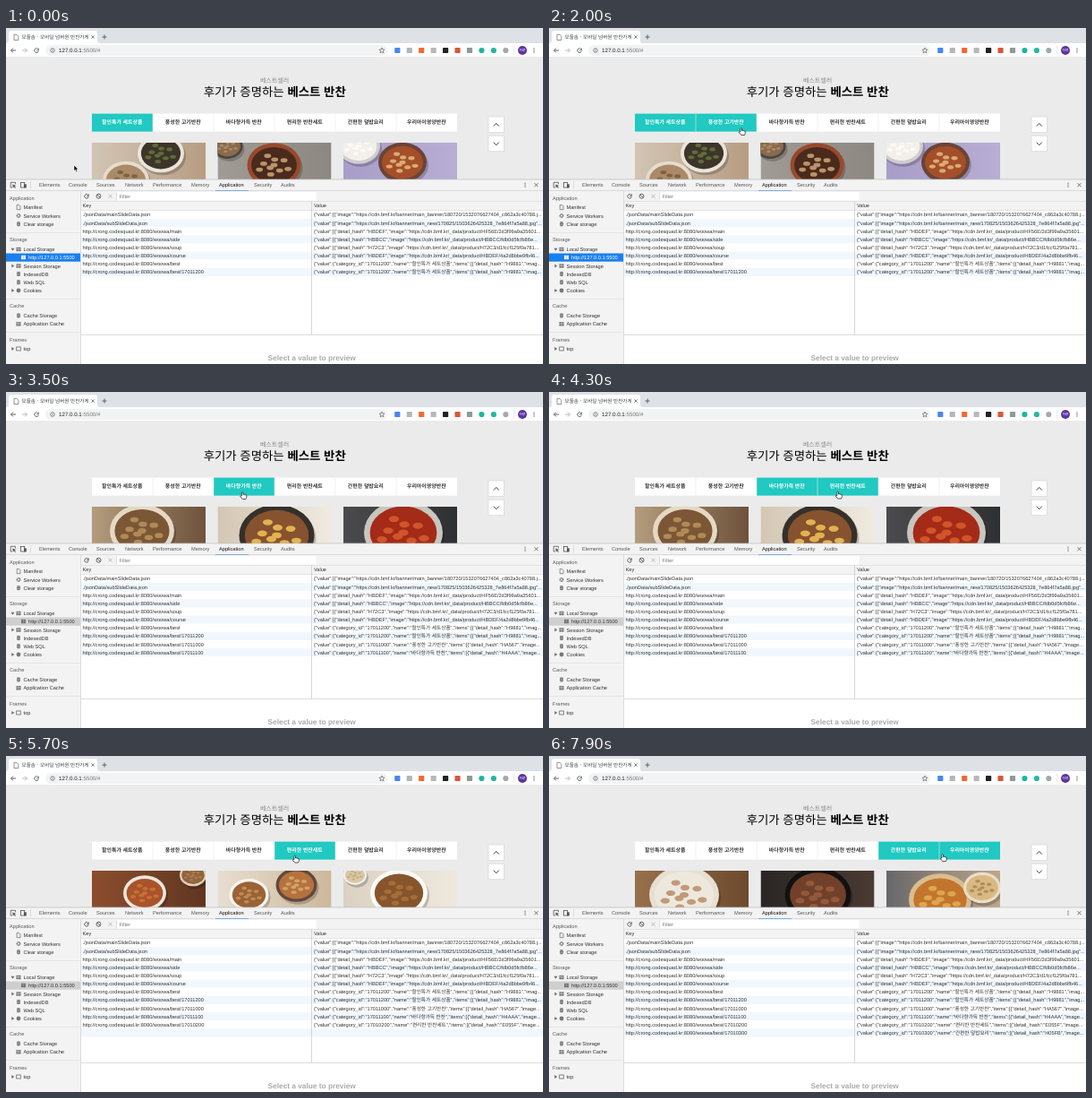
These frames come from a looping animation (600 by 375 pixels, 8 s). An HTML page:

```html
<!DOCTYPE html>
<html lang="ko">
<head>
<meta charset="utf-8">
<style>
html, body { margin: 0; width: 100%; height: 100%; overflow: hidden; background: #fff; }
svg { display: block; width: 600px; height: 375px; }
text { font: 5.65px 'Liberation Sans', 'Noto Sans CJK KR', 'Noto Sans CJK', sans-serif; fill: #333; text-rendering: geometricPrecision; }
.ko { font-family: 'Noto Sans CJK KR', 'Noto Sans CJK', sans-serif; }
</style>
</head>
<body>
<svg id="stage" viewBox="0 0 600 375"></svg>
<script>
const LOOP = 8000, TEAL = '#20c9c1', LINE = '#cdcdcd';
const stage = document.getElementById('stage');

const rect = (x, y, w, h, fill, more = '') =>
  `<rect x="${x}" y="${y}" width="${w}" height="${h}" fill="${fill}" ${more}/>`;
const oval = (x, y, rx, ry, fill, more = '') =>
  `<ellipse cx="${x}" cy="${y}" rx="${rx}" ry="${ry}" fill="${fill}" ${more}/>`;
const path = (d, stroke = '#5f6368', width = 1, fill = 'none') =>
  `<path d="${d}" stroke="${stroke}" stroke-width="${width}" fill="${fill}"/>`;
const text = (x, y, s, style = '', more = '') =>
  `<text x="${x}" y="${y + 2}" style="${style}" ${more}>${s}</text>`;
const centred = (x, y, s, style, more = '') =>
  text(x, y, s, style + ';text-anchor:middle', more);
const cross = (x, y, r, color, width = .8) =>
  path(`M${x - r} ${y - r}l${2 * r} ${2 * r}m0 ${-2 * r}l${-2 * r} ${2 * r}`, color, width);
const reload = (x, y, r, color) =>
  path(`M${x + r * .7} ${y - r * .7}A${r} ${r} 0 1 0 ${x + r} ${y + r * .3}M${x + r} ${y - r}v${r * .9}h${-r * .9}`, color, .9);
const dots = (x, y) => [-2, 0, 2].map(d => oval(x, y + d, .65, .65, '#5f6368')).join('');

const categories = [
  ['17011200', '할인특가 세트상품', 'H9881', 'imag'],
  ['17011000', '풍성한 고기반찬', 'HA567', 'image'],
  ['17011100', '바다향가득 반찬', 'H4AAA', 'image'],
  ['17010200', '편리한 반찬세트', 'E055F', 'image'],
  ['17010300', '간편한 덮밥요리', 'H05FB', 'image'],
  ['', '우리아이영양반찬']
];
const clicks = [2300, 3300, 5500, 7300];

// Each photo: two background tones, then dishes as x, y, radius, rim, food, garnish.
const photoSets = [
  [
    ['#d2c5b4', '#b69d82', [38, 42, 26, '#e6dccd', '#a98a69', '#84623f'], [77, 12, 26, '#eae4da', '#3d3529', '#5f6b3a']],
    ['#a09b94', '#8d8781', [11, 4, 17, '#4b443f', '#8a6a4c', '#a98a64'], [63, 25, 30, '#98492c', '#4a2a1d', '#b9946a']],
    ['#a79dc8', '#b8aed4', [17, 4, 24, '#d0cbd0', '#f3f0e9', '#fbfaf7'], [66, 22, 27, '#6b4436', '#a54f2a', '#d9ab72']]
  ], [
    ['#34312e', '#cbbfac', [55, 32, 41, '#1d1c1b', '#98633a', '#d29b52']],
    ['#d3c6b3', '#f0eae0', [66, 32, 42, '#36302b', '#87522f', '#e3b250']],
    ['#e0ddd7', '#f1efeb', [56, 27, 38, '#9b7a59', '#f1efec', '#f6f5f2']]
  ], [
    ['#b49c7d', '#6e523c', [56, 27, 36, '#e5d9c5', '#7b5735', '#b08a56']],
    ['#d3c6b3', '#f0eae0', [66, 32, 42, '#36302b', '#87522f', '#e3b250']],
    ['#4b4b4d', '#2f3032', [67, 29, 44, '#c9c5bf', '#a32b17', '#d2542a']]
  ], [
    ['#8c4d2e', '#603620', [59, 25, 24, '#eee7dd', '#a9532b', '#c56f36'], [113, 5, 15, '#ded1bc', '#92643b', '#ab7c50']],
    ['#e7ded0', '#cdb79b', [35, 27, 22, '#f8f5ee', '#9b6237', '#c08d52'], [88, 16, 23, '#62483b', '#b5723f', '#d0a267']],
    ['#dbd1c2', '#eee8de', [62, 25, 32, '#fbfaf6', '#87552c', '#a56d38'], [13, 5, 13, '#f5f2ec', '#d9c7a6', '#c4aa80']]
  ], [
    ['#98704b', '#6d4a2f', [55, 27, 39, '#e7dfd1', '#eee8dc', '#c09a7a']],
    ['#2a2625', '#4a3a32', [64, 27, 37, '#12110f', '#70402b', '#94593a']],
    ['#67676a', '#bfa689', [60, 32, 35, '#d9bd8f', '#c3752d', '#dda650'], [107, 19, 21, '#e8decb', '#d9b980', '#b08d60']]
  ]
];

function photo([from, to, ...dishes], i, id) {
  const x0 = 96 + i * 140.5, y0 = 128;
  let out = `<linearGradient id="${id}"><stop stop-color="${from}"/><stop offset="1" stop-color="${to}"/></linearGradient>`
    + `<clipPath id="c${id}">${rect(x0, y0, 127, 41, '#000')}</clipPath><g clip-path="url(#c${id})">`
    + rect(x0, y0, 127, 41, `url(#${id})`);
  for (const [dx, dy, r, rim, food, garnish] of dishes) {
    const x = x0 + dx, y = y0 + dy;
    out += oval(x + 2, y + 3, r, r * .82, '#000', 'opacity=".2"')
      + oval(x, y, r, r * .82, rim) + oval(x, y, r * .85, r * .67, food);
    for (let j = 0; j < 10; j++) {
      const a = j * 2.4, q = r * .62 * Math.sqrt(j / 10);
      out += oval(x + q * Math.cos(a), y + q * .75 * Math.sin(a), r * .13, r * .08, garnish);
    }
  }
  return out + '</g>';
}

function browserBar() {
  const extensions = ['#4688f1', '#b3b6ba', '#f06a35', '#b5b8bc', '#222', '#d9583b', '#8f9a98', '#1cb5a3', '#27b79d', '#a5a8ad'];
  return rect(0, 0, 600, 17, '#dee1e6')
    + path('M0 17Q3 17 3 14V6Q3 3 6 3H99Q102 3 102 6V14Q102 17 105 17Z', 'none', 0, '#fff')
    + path('M9 7.3h3l1.8 1.8v4.4h-4.8Z', '#666', .7)
    + text(17.5, 10, '모둘솜 - 모바일 넘버원 반찬가게', 'font-size:5.6px;fill:#3c4043', 'class="ko"')
    + cross(97, 10, 1.6, '#5f6368') + path('M107.5 10h5m-2.5-2.5v5')
    + rect(0, 17, 600, 16, '#fff')
    + path('M11 25H5.5m2.5-2.5L5.5 25 8 27.5') + path('M18 25h5.5M21 22.5l2.5 2.5-2.5 2.5', '#babcbe')
    + reload(34, 25, 2.4, '#5f6368')
    + rect(44, 19, 382, 12, '#f1f3f4', 'rx="6"')
    + oval(52, 25, 2.3, 2.3, 'none', 'stroke="#5f6368" stroke-width=".7"') + path('M52 24.6v1.7M52 23.4v.6', '#5f6368', .7)
    + text(59, 25, '127.0.0.1<tspan fill="#777">:5500/#</tspan>', 'font-size:6.2px;fill:#202124')
    + path('M420 22l.9 2 2.1.2-1.6 1.4.5 2.2-1.9-1.2-1.9 1.2.5-2.2-1.6-1.4 2.1-.2Z', '#5f6368', .7)
    + extensions.map((c, i) => rect(434.2 + i * 13.45, 21.9, 6.2, 6.2, c, `rx="${i < 7 ? .8 : 3.1}"`)).join('')
    + rect(567.5, 20, .6, 10, '#d5d7da') + oval(577, 25, 5, 5, '#5b35a0')
    + centred(577, 24.4, '하루', 'font-size:3.8px;fill:#fff') + dots(590, 25)
    + rect(0, 32.5, 600, .6, '#d8d8d8');
}

function page() {
  let out = rect(0, 33, 600, 137, '#ebebeb')
    + centred(300, 58.8, '베스트셀러', 'font-size:7px;fill:#888', 'class="ko"')
    + centred(300.2, 74.2, '후기가 증명하는 <tspan font-weight="700">베스트 반찬</tspan>', 'font-size:13.4px;font-weight:350;fill:#000', 'class="ko"');
  categories.forEach(([, name], i) => {
    out += rect(96 + i * 68, 95.6, 68, 20, '#fff', 'class="tab"')
      + centred(129.8 + i * 68, 105.1, name, 'font-size:5.95px;font-weight:700', 'class="ko label"');
    if (i) out += rect(95.7 + i * 68, 95.6, .6, 20, '#e6e6e6');
  });
  out += photoSets.map((set, s) => `<g class="photos">${set.map((p, i) => photo(p, i, `p${s}${i}`)).join('')}</g>`).join('');
  for (const [y, d] of [[99, 'M544.8 109.6l3-3.2 3 3.2'], [120.2, 'M544.8 127.6l3 3.2 3-3.2']])
    out += rect(539, y, 17.5, 17.5, '#fff', 'stroke="#d6d6d6" stroke-width=".7"') + path(d, '#444', 1);
  return out;
}

function sidebar() {
  const heads = [['Application', 190], ['Storage', 236], ['Cache', 310], ['Frames', 347.5]];
  const items = [['Manifest', 200], ['Service Workers', 209.5], ['Clear storage', 218.7], ['Local Storage', 247], ['Session Storage', 265.5],
    ['IndexedDB', 274.6], ['Web SQL', 283.8], ['Cookies', 293], ['Cache Storage', 321], ['Application Cache', 330.3], ['top', 358]];
  const tree = { 'Local Storage': 'M5.5 245.7h4l-2 3Z', 'Session Storage': 'M6.3 263.5v4l3-2Z', Cookies: 'M6.3 291v4l3-2Z', top: 'M6.3 356v4l3-2Z' };
  const grid = (x, y, color, line = '#f3f3f3') =>
    rect(x - 2.5, y - 2.2, 5, 4.4, color) + path(`M${x - 2.5} ${y - .3}h5M${x} ${y - 2.2}v4.4`, line, .5);
  const icon = (name, y) =>
    name == 'Manifest' ? path(`M12.2 ${y - 2.6}h2.4l1.4 1.5v3.8h-3.8Z`, '#666', .7)
    : name == 'Service Workers' ? oval(14, y, 1.7, 1.7, 'none', 'stroke="#666" stroke-width="1.4" stroke-dasharray="1 .4"')
    : name == 'top' ? rect(11.7, y - 2, 4.6, 4, 'none', 'stroke="#666" stroke-width=".8"')
    : name == 'Cookies' ? oval(14, y, 2.4, 2.4, '#777')
    : name == 'Clear storage' || name == 'IndexedDB' || name == 'Web SQL' || name == 'Cache Storage'
      ? rect(12, y - 2.5, 4, 5, '#6e6e6e', 'rx="1.4"') + path(`M12 ${y - .9}h4m-4 1.8h4`, '#f3f3f3', .4)
    : grid(14, y, '#6e6e6e');
  return rect(0, 182, 83, 193, '#f3f3f3')
    + [228, 302, 339.5].map(y => rect(0, y, 83, .6, '#dcdcdc')).join('')
    + heads.map(([s, y]) => text(4, y, s, 'fill:#5a5a5a')).join('')
    + rect(0, 251.5, 83, 9.2, '#1a80f0', 'id="pick"')
    + `<g id="pickIcon">${grid(19.5, 256, 'currentColor', '#aaa')}</g>`
    + text(25, 256, 'http://127.0.0.1:5500', '', 'id="pickText"')
    + items.map(([s, y]) => icon(s, y) + text(19.5, y, s) + (tree[s] ? path(tree[s], 'none', 0, '#6e6e6e') : '')).join('')
    + rect(83, 182, .7, 193, LINE);
}

function table() {
  const host = 'http://crong.codesquad.kr:8080/woowa/', cdn = 'https://cdn.bmf.kr/';
  const banner = s => `{"value":[{"image":"${cdn}banner/${s}...`;
  const product = (hash, s) => `{"value":[{"detail_hash":"${hash}","image":"${cdn}_data/product/${s}...`;
  const category = ([id, name, hash, tail]) => `{"value":{"category_id":"${id}","name":"${name}","items":[{"detail_hash":"${hash}","${tail}...`;
  const rows = [
    ['./jsonData/mainSlideData.json', banner('main_banner/180720/1532076627404_c862a3c40788.j')],
    ['./jsonData/subSlideData.json', banner('main_new/170825/1503626425328_7e864f7a5a88.jpg"')],
    [host + 'main', product('HBDEF', 'HF56E/2d3f99a9a35601')],
    [host + 'side', product('HBBCC', 'HBBCC/fdb0d5fcfb86e')],
    [host + 'soup', product('H72C3', 'H72C3/d1fccf125f0a781')],
    [host + 'course', product('HBDEF', 'HBDEF/4a2d8bbe9fb46')],
    [host + 'best', category(categories[0])],
    ...categories.slice(0, 5).map(c => [host + 'best/' + c[0], category(c)])
  ];
  return rect(84, 182, 516, 11.5, '#f3f3f3') + rect(123.5, 183, 223, 9.5, '#fff')
    + reload(90, 187.7, 2.3, '#555')
    + oval(103.5, 187.7, 2.5, 2.5, 'none', 'stroke="#555" stroke-width=".9"') + path('M101.8 186l3.4 3.4', '#555', .9)
    + cross(116.5, 187.7, 2, '#aaa') + rect(123, 183, .6, 9.5, LINE) + text(126.5, 187.7, 'Filter', 'fill:#777')
    + rect(84, 193.2, 516, .6, LINE) + rect(84, 193.8, 516, 9.7, '#f3f3f3')
    + text(85.5, 198.3, 'Key') + text(344, 198.3, 'Value') + rect(84, 203.3, 516, .6, LINE)
    + `<clipPath id="values">${rect(342, 203, 256.5, 140, '#000')}</clipPath>`
    + rows.map(([key, value], i) => {
      const y = 208.4 + i * 9.15;
      return rect(84, y - 4.6, 516, 9.15, i % 2 ? '#f1f7fd' : '#fff', 'class="stripe"')
        + `<g class="row">${text(85.5, y, key)}<g clip-path="url(#values)">${text(344, y, value)}</g></g>`;
    }).join('')
    + rect(341, 193.5, .7, 149, '#c4c4c4') + rect(84, 342, 516, .7, LINE)
    + centred(341.7, 368.8, 'Select a value to preview', 'font-size:8.3px;font-weight:700;fill:#aaa');
}

function devtools() {
  const tabs = { Elements: 37, Console: 70, Sources: 101, Network: 133, Performance: 164, Memory: 207, Application: 238, Security: 277, Audits: 307 };
  return rect(0, 169, 600, 206, '#fff') + rect(0, 169, 600, 12.5, '#f3f3f3') + rect(0, 168.6, 600, .7, '#bbb')
    + rect(0, 181.2, 600, .7, LINE)
    + path('M7 178H5.2V172.3H10.5V174.3', '#555', .8) + path('M7.3 174.5l4 1.5-1.7.7 1.3 1.7-.7.6-1.3-1.8-1.1 1.2Z', 'none', 0, '#555')
    + rect(16.5, 172.5, 4.2, 5.5, 'none', 'stroke="#555" stroke-width=".8"') + rect(20, 174.3, 2.8, 4.1, '#555')
    + rect(27, 171, .6, 8.5, LINE)
    + Object.entries(tabs).map(([s, x]) => text(x, 175, s, s == 'Application' ? 'fill:#111' : 'fill:#555')).join('')
    + rect(234, 181, 37, .8, '#6d9fe0')
    + dots(580, 175.2) + cross(592.5, 175.2, 2, '#555') + sidebar() + table();
}

stage.innerHTML = browserBar() + page() + devtools()
  + `<g id="arrow">${path('M0 0V6.6L1.6 5.2 2.7 7.7 3.9 7.2 2.8 4.8H4.8Z', '#fff', .6, '#000')}</g>`
  + `<g id="hand">${path('M-.6 4.5V.7Q.2-.5 1 .7V3Q1.8 2.4 2.4 3.2 3.2 2.7 3.7 3.5 4.6 3.2 4.8 4.2V5.6Q4.7 6.8 4 8H.3L-2.2 5.1Q-2.1 4-.6 4.5Z', '#111', .7, '#fff')}</g>`;

const all = s => [...stage.querySelectorAll(s)], one = id => document.getElementById(id);
const tabs = all('.tab'), labels = all('.label'), photos = all('.photos'), rows = all('.row'), stripes = all('.stripe');
const show = (el, on) => el.style.display = on ? '' : 'none';

// Pointer stops: time, x, y.
const route = [[0, 76, 153], [300, 76, 153], [1100, 214.5, 111.5], [2450, 214.5, 111.5], [2800, 251.5, 111.5], [3100, 264, 111.5],
  [3700, 264, 111.5], [4200, 322.5, 111], [6350, 322.5, 111], [6750, 390.5, 110.5], [7450, 390.5, 110.5], [7900, 439.5, 109.5], [8000, 443, 109.5]];

function pointer(t) {
  const i = route.findIndex(stop => stop[0] > t), [t0, x0, y0] = route[i - 1], [t1, x1, y1] = route[i];
  const u = (t - t0) / (t1 - t0), e = u * u * (3 - 2 * u);
  return [x0 + (x1 - x0) * e, y0 + (y1 - y0) * e];
}

function draw(t) {
  const [x, y] = pointer(t), active = clicks.filter(c => t >= c).length, count = 8 + active;
  const hover = y >= 96 && y < 116 && x >= 96 ? Math.floor((x - 96) / 68) : -1;
  tabs.forEach((tab, i) => {
    const on = i == active || i == hover;
    tab.setAttribute('fill', on ? TEAL : '#fff');
    labels[i].style.fill = on ? '#fff' : '#333';
  });
  photos.forEach((set, i) => show(set, i == active));
  rows.forEach((row, i) => show(row, i < count));
  // The empty row below the data is striped too.
  stripes.forEach((stripe, i) => show(stripe, i <= count));
  one('pick').setAttribute('fill', active ? '#cfcfcf' : '#1a80f0');
  one('pickText').style.fill = active ? '#333' : '#fff';
  one('pickIcon').style.color = active ? '#6e6e6e' : '#fff';
  for (const [id, on] of [['arrow', hover < 0], ['hand', hover >= 0]]) {
    show(one(id), on);
    one(id).setAttribute('transform', `translate(${x} ${y})`);
  }
}

const start = performance.now();
function tick() {
  draw((performance.now() - start) % LOOP);
  requestAnimationFrame(tick);
}
tick();
</script>
</body>
</html>
```
